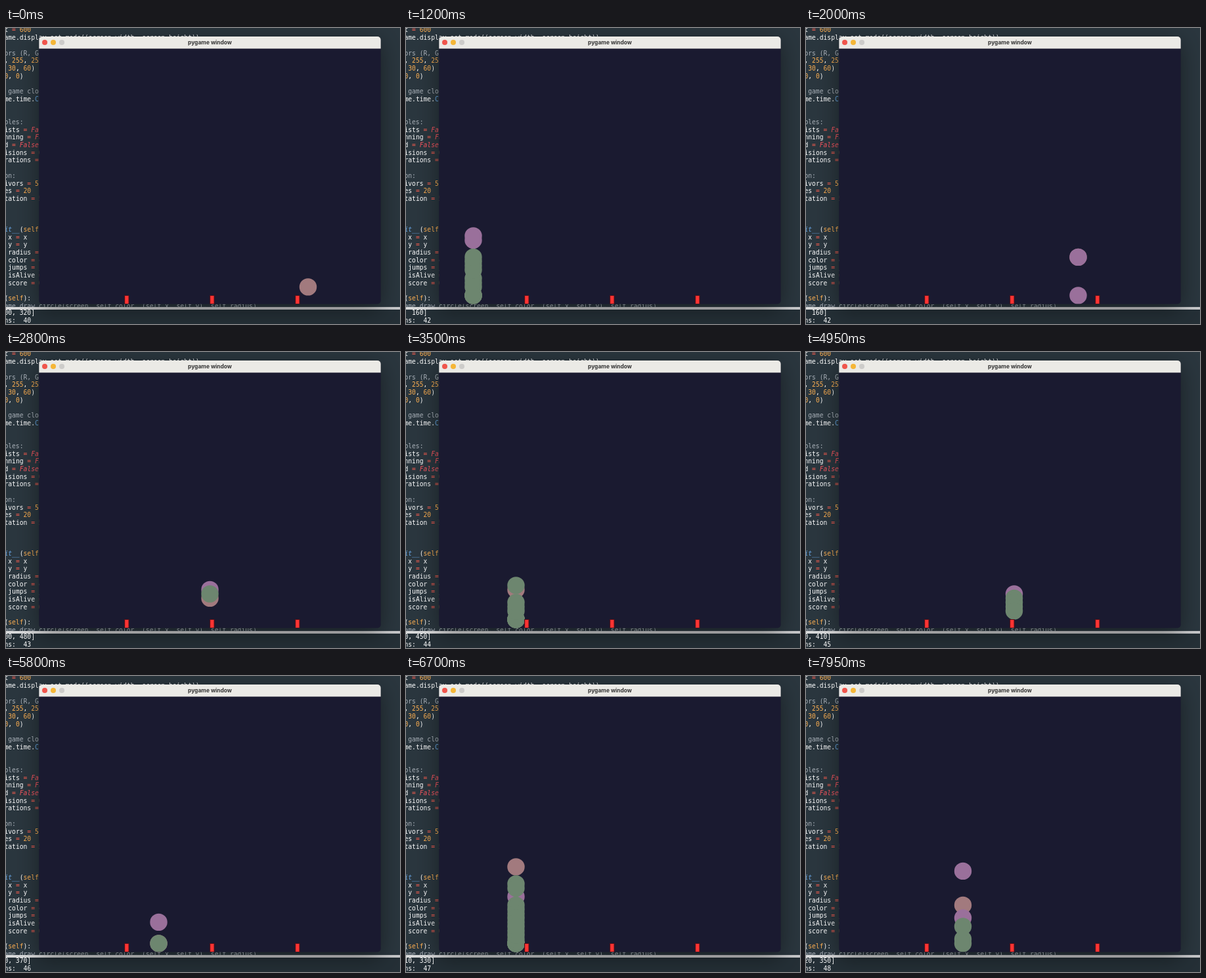
An HTML page with a canvas that plays this animation: 600x452 px, repeating every 8000 ms.

```html
<!DOCTYPE html>
<html lang="en">
<head>
<meta charset="utf-8">
<title>Jumping balls</title>
<style>
  html, body { margin: 0; width: 100%; height: 100%; overflow: hidden; background: #27333a; }
  canvas { display: block; }
</style>
</head>
<body>
<canvas id="stage" width="600" height="452"></canvas>
<script>
const ctx = document.getElementById("stage").getContext("2d");
const MONO = '9.68px "DejaVu Sans Mono", monospace';
const CHAR = 5.828, TEXT_LEFT = -2.6;
const LEFT = 50.5, TOP = 31.4, SCALE = 0.65;   // game units to stage pixels
const COURSE = 640, STEP = 30, FRAME = 50, FRAMES = 160;
const COLORS = { pink: "#a27a7e", purple: "#9a709b", green: "#6d866f" };

// Visible part of the editor, by line number; "#" marks a comment.
const CODE = {
  0: "t = 600",
  1: "ame.display.set_mode((screen_width, screen_height))",
  3: "#ors (R, G, B)", 4: ", 255, 255)", 5: " 30, 60)", 6: "0, 0)",
  8: "# game clock", 9: "me.time.Clock()",
  12: "#bles:", 13: "ists = False", 14: "nning = False", 15: "d = False",
  16: "isions = 0", 17: "rations = 0",
  19: "#on:", 20: "ivors = 5", 21: "es = 20", 22: "tation = 5",
  26: "it__(self, x, y)", 27: " x = x", 28: " y = y", 29: " radius = 20",
  30: " color = color", 31: " jumps = jumps", 32: " isAlive = True", 33: " score = 0",
  35: "(self):",
  36: "#ame.draw.circle(screen, self.color, (self.x, self.y), self.radius)"
};
const TOKENS = /False|True|self|it__|Clock|\d+|=|[^\d=]/g;
const TOKEN_COLORS = {
  "=": "#ff5f50", False: "#fb5560", True: "#fb5560",
  self: "#ffb052", it__: "#66a4e4", Clock: "#66a4e4"
};

// Each ball is the list of x positions where it jumps.
const GENERATIONS = [
  { log: "00, 320]", pink: ["160 360 560"] },
  { log: "0, 520]", pink: ["150 350 570"], purple: ["20 60 170 370"], green: ["160 340 380"] },
  { log: "  160]", pink: ["170 360 560"], purple: ["30 60 170 360 560", "20 70 180 370"] },
  { log: "00, 480]", pink: ["150 360 570"], purple: ["160 380 560"], green: ["170 370"] },
  { log: "0, 450]", pink: ["160 360 540 580"], green: ["170 370"] },
  { log: "0, 410]", purple: ["160 380 560"], green: ["170 370", "150 360 570", "180 350", "160 340"] },
  { log: "0, 370]", pink: ["160 350 560"], purple: ["40 90 180 370"], green: ["170 360"] },
  { log: "10, 330]", pink: ["170 180 370 560"], purple: ["100 140 190 380 570"],
    green: ["130 160 360", "120 150 350", "180 370", "170", "160", "150", "140"] },
  { log: "20, 350]", pink: ["150 290"], purple: ["160 270 280", "160 200"],
    green: ["140 190", "110 150", "160"] }
].map((generation, g) => {
  const balls = [];
  for (const color of ["pink", "purple", "green"])
    for (const jumps of generation[color] || [])
      balls.push({ color, jumps: jumps.split(" ").map(Number) });
  // Beginners jump once, too early for the first obstacle.
  for (let k = 0; k < 13; k++)
    if ((3 * k + g) % 5 !== 1) balls.push({ color: "green", jumps: [10 + 10 * k] });
  return { log: generation.log, balls };
});

// Height above the floor, or -1 after hitting an obstacle.
function heightAt(jumps, x) {
  let height = 0;
  for (let at = 0; at <= x; at += 10) {
    if (jumps.includes(at)) height += 100;
    height = Math.max(0, height - 10);
    const past = at % 200;
    const touching = (at >= 190 && past === 190) || (at >= 200 && past <= 20);
    if (touching && height < 20) return -1;
  }
  return height;
}

function rect(x, y, w, h, fill) {
  ctx.fillStyle = fill;
  ctx.fillRect(x, y, w, h);
}

function circle(x, y, r, fill) {
  ctx.fillStyle = fill;
  ctx.beginPath();
  ctx.arc(x, y, r, 0, 2 * Math.PI);
  ctx.fill();
}

function roundRect(x, y, w, h, radii, fill) {
  ctx.fillStyle = fill;
  ctx.beginPath();
  ctx.roundRect(x, y, w, h, radii);
  ctx.fill();
}

function text(string, x, y, fill, font = MONO) {
  ctx.font = font;
  ctx.fillStyle = fill;
  ctx.fillText(string, x, y);
}

function drawCode(line, y) {
  if (line[0] === "#") return text(line.slice(1), TEXT_LEFT, y, "#a9b0b8");
  let x = TEXT_LEFT;
  for (const token of line.match(TOKENS)) {
    const italic = /False|True|it__/.test(token) ? "italic " : "";
    const color = TOKEN_COLORS[token] || (/\d/.test(token) ? "#ffb052" : "#ffffff");
    text(token, x, y, color, italic + MONO);
    x += token.length * CHAR;
  }
}

function drawEditor(log, number) {
  rect(0, 0, 600, 452, "#2a363e");
  for (const n in CODE) drawCode(CODE[n], 6.4 + n * 11.71);
  rect(0, 426, 600, 26, "#242f36");
  const divider = ctx.createLinearGradient(0, 0, 600, 0);
  divider.addColorStop(0, "#d8d9da");
  divider.addColorStop(0.5, "#c6c7c9");
  rect(0, 426, 600, 4, divider);
  text(log, TEXT_LEFT, 438, "#ffffff");
  text("ns:  " + number, TEXT_LEFT, 449.6, "#ffffff");
}

function drawWindow() {
  ctx.save();
  ctx.shadowColor = "rgba(0,0,0,.42)";
  ctx.shadowBlur = 34;
  ctx.shadowOffsetY = 8;
  roundRect(50.3, 13, 520.4, 408.4, 5, "#1a1a30");
  ctx.restore();

  roundRect(50.3, 13, 520.4, 18.4, [5, 5, 0, 0], "#ebeae6");
  ["#f0554c", "#f5b637", "#cdccca"].forEach((c, i) => circle(59 + 13 * i, 22, 4, c));
  ctx.textAlign = "center";
  text("pygame window", 310.5, 25.2, "#343434", "700 8.4px Inter, sans-serif");
  ctx.textAlign = "left";
}

function drawObstacles() {
  for (const x of [200, 400, 600]) {
    const left = LEFT + x * SCALE - 0.5;
    rect(left, 408, 7.7, 13.4, "#501019");
    rect(left + 1.2, 409, 5.3, 12, "#ff3433");
  }
}

function drawBalls(balls, x) {
  ctx.save();
  ctx.beginPath();
  ctx.rect(50, 31, 521, 390.6);
  ctx.clip();
  for (const { color, jumps } of balls) {
    const height = heightAt(jumps, x);
    if (height >= 0)
      circle(LEFT + x * SCALE, TOP + (580 - height) * SCALE, 13.2, COLORS[color]);
  }
  ctx.restore();
}

function draw(now) {
  const travelled = Math.floor(now / FRAME) % FRAMES * STEP;
  const index = Math.ceil(travelled / COURSE);
  const run = travelled - (index - 1) * COURSE;
  const x = run >= 630 ? run - 10 : run;   // brief pause at the end of a run
  const { log, balls } = GENERATIONS[index];

  drawEditor(log, 40 + index);
  drawWindow();
  drawBalls(balls, x);
  drawObstacles();
}

let start;
function tick(now) {
  start ??= now;
  draw(Math.max(0, now - start));
  requestAnimationFrame(tick);
}
requestAnimationFrame(tick);
</script>
</body>
</html>
```
